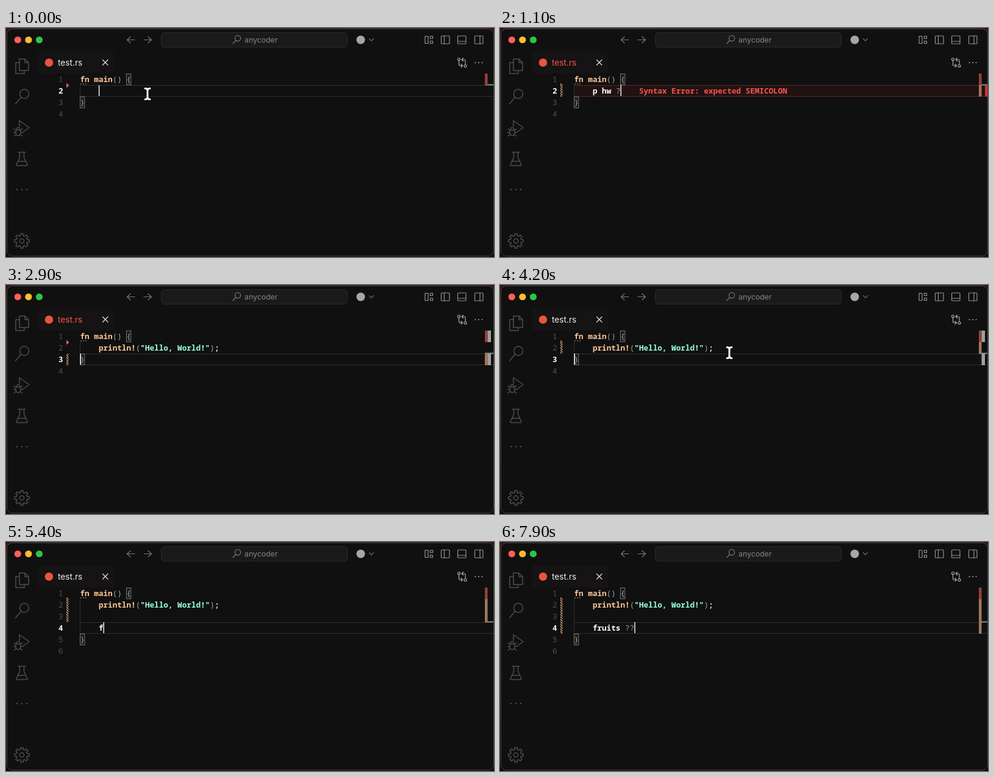
An HTML page for the animation above (8 s loop, 800 by 377 pixels).

```html
<!DOCTYPE html>
<html lang="en">
<head>
<meta charset="utf-8">
<title>Editor typing</title>
<style>
  html, body { margin: 0; height: 100%; overflow: hidden; background: #000; }
  svg { display: block; width: 800px; height: 377px; }
  .ui { font-family: Inter, "Open Sans", sans-serif; }
  .code { font: 12.67px "Noto Sans Mono", "DejaVu Sans Mono", monospace; white-space: pre; }
  .icon { fill: none; stroke-linecap: round; stroke-linejoin: round; }
</style>
</head>
<body>
<svg viewBox="0 0 800 377">
  <defs>
    <linearGradient id="desk" x2="0" y2="1">
      <stop offset="0" stop-color="#35150f"/>
      <stop offset=".6" stop-color="#2a1a15"/>
      <stop offset="1" stop-color="#0c0a0a"/>
    </linearGradient>
    <pattern id="hatch" width="4" height="4" patternUnits="userSpaceOnUse">
      <path d="M-1 -1L5 5M-1 3L1 5M3 -1L5 1" stroke="#e0ae82" stroke-width="1.3"/>
    </pattern>
  </defs>
  <rect width="800" height="377" fill="url(#desk)"/>
  <rect x="1.5" y="1.5" width="798" height="374" rx="9" fill="#101010" stroke="#454240"/>

  <g id="lights"></g>
  <rect x="254.5" y="7.5" width="305" height="24" rx="5.5" fill="#1a1a1a" stroke="#2b2b2b"/>
  <g class="icon" stroke="#777" stroke-width="1.2">
    <path d="M204 14.5L198.5 19.5L204 24.5M199 19.5H211M233 14.5L238.5 19.5L233 24.5M238 19.5H226"/>
    <circle cx="380" cy="17" r="4.6"/><path d="M376.7 20.5L372 25.5M595.5 17.7L599 21.2L602.5 17.7"/>
  </g>
  <circle cx="581.5" cy="19.5" r="7" fill="#a6a6a6"/>
  <text class="ui" x="391" y="23.7" font-size="12.3" fill="#858585">anycoder</text>
  <g class="icon" stroke="#929292" stroke-width="1.2">
    <path d="M687 13.5h5v12h-5zM695.5 13.5h4v4h-4zM695.5 21.5h4v4h-4z"/>
    <rect x="713.5" y="13" width="13.5" height="13" rx="1"/><path d="M718.5 13v13"/>
    <rect x="740.5" y="13" width="13.5" height="13" rx="1"/><path d="M741 22h13"/>
    <rect x="768.5" y="13" width="13.5" height="13" rx="1"/><path d="M777 13v13"/>
  </g>

  <path d="M52 75V43q0-5 5-5H172q5 0 5 5V75z" fill="#151313"/>
  <circle cx="70.5" cy="57" r="6.8" fill="#e8563c"/>
  <text id="tab" class="ui" x="85" y="61.5" font-size="13.7">test.rs</text>
  <path class="icon" d="M158.5 52.5l8.5 8.5m0-8.5l-8.5 8.5" stroke="#ddd" stroke-width="1.3"/>
  <g class="icon" stroke="#aaa" stroke-width="1.2">
    <circle cx="742.5" cy="51.5" r="2"/><circle cx="753" cy="62.5" r="2"/>
    <path d="M742.5 53.5V60q0 2 2 2h3.5M746 59.5l2.5 2.5l-2.5 2.5M753 60.5V54q0-2-2-2h-3.5M749.5 49.5l-2.5 2.5l2.5 2.5"/>
  </g>
  <path class="icon" d="M769.5 57h.01M775 57h.01M780.5 57h.01" stroke="#aaa" stroke-width="2"/>

  <g class="icon" stroke="#4d4d4d" stroke-width="1.5">
    <path d="M22 51h9l6 6v13H22zM31 51v6h6M22 57h-6v18h14v-5"/>
    <circle cx="30" cy="108.5" r="7.5"/><path d="M24.7 114L15.5 125"/>
    <path d="M22 162v-9.5L38 164l-11 8M16 168h8v4q0 5-4 5t-4-5zM17 168q0-4 3-4t3 4M13 166l3 2M27 166l-3 2M12.5 172H16M24 172h3.5M13 178l3.5-2.5M27 178l-3.5-2.5"/>
    <path d="M20 204.5h12M22.5 205v8L17 225q-.5 1.5 1 1.5H34q1.5 0 1-1.5L29.5 213v-8M20 219.5h12"/>
    <path id="gear"/><circle cx="26" cy="350.5" r="3.6"/>
  </g>
  <path class="icon" d="M18 266h.01M26 266h.01M34 266h.01" stroke="#4d4d4d" stroke-width="2.6"/>

  <g id="editor" class="code"></g>
</svg>
<script>
const LOOP = 8000, LEFT = 121.5, CHAR = 7.6, ROW = 19;
const PEACH = '#ffc799', MINT = '#99ffe4', GREY = '#a0a0a0', RED = '#f75450';
const byId = id => document.getElementById(id);
const rowY = n => 75 + ROW * (n - 1);
const rect = (x, y, w, h, fill, more = '') =>
  `<rect x="${x}" y="${y}" width="${w}" height="${h}" fill="${fill}" ${more}/>`;
const label = (x, n, s, fill, more = '') =>
  `<text x="${x}" y="${rowY(n) + 13.5}" fill="${fill}" ${more}>${s}</text>`;
const bold = 'font-weight="700"';

byId('lights').innerHTML = ['#ff5f57', '#febc2e', '#28c840'].map((c, i) =>
  `<circle cx="${19.3 + 17.6 * i}" cy="19.5" r="5.6" fill="${c}"/>`).join('');

// Eight square teeth
const teeth = [];
for (let i = 0; i < 8; i++) {
  for (const [off, r] of [[-.25, 9], [-.17, 12.3], [.17, 12.3], [.25, 9]]) {
    const a = i * Math.PI / 4 + off;
    teeth.push(`${(26 + r * Math.cos(a)).toFixed(1)} ${(350.5 + r * Math.sin(a)).toFixed(1)}`);
  }
}
byId('gear').setAttribute('d', `M${teeth.join('L')}Z`);

const PRINT = '    println!("Hello, World!");';
const SHORT = [200, 400, 500, 700, 800, 1000, 1300];
const FRUITS = [5400, 5500, 5700, 5800, 5900, 6100, 6300, 7200, 7500];
const EDITS = [0, ...SHORT, 2800, 4500, 4700, 5000, ...FRUITS];
const typed = (s, times, t) => s.slice(0, times.filter(k => k <= t).length);

function stateAt(t) {
  const body = [], s = { row: 2, hatch: null };
  if (t < 2800) {
    body.push('    ' + typed('p hw ??', SHORT, t));
    if (t >= 700) s.hatch = [2, 2];
  } else {
    body.push(PRINT);
    if (t >= 4700) body.push(t < 5000 ? '    ' : '');
    if (t >= 5000) body.push('    ' + typed('fruits ??', FRUITS, t));
    s.row = t < 4500 ? 3 : body.length + 1;
    s.hatch = t < 3400 ? [3, 3] : [2, t < 5200 ? 2 : t < 5700 ? 3 : 4];
  }
  s.lines = ['fn main() {', ...body, '}', ''];
  s.col = s.lines[s.row - 1] === '}' ? 0 : s.lines[s.row - 1].length;
  s.error = t >= 1000 && t < 2800;
  s.redTab = t >= 1000 && t < 3500;
  const last = EDITS.filter(k => k <= t).pop();
  s.caret = (t - last) % 1000 < 500;
  return s;
}

function codeLine(line, n) {
  return [...line.matchAll(/"[^"]*"|\w+!?|[^\s\w]/g)].map(m => {
    const w = m[0];
    const fill = w[0] === '"' ? MINT : /^(fn|main|println!)$/.test(w) ? PEACH
      : /\w/.test(w) ? '#fff' : w === ';' ? '#ddd' : GREY;
    return label(LEFT + CHAR * m.index, n, w, fill, /[\w;]/.test(w) ? bold : '');
  }).join('');
}

function pointer(t) {
  if (t >= 200 && t < 3700 || t >= 4700) return '';
  let x = 232, y = 108.5;
  if (t >= 3700) {
    const go = Math.min(1, (t - 3700) / 400), ease = go * go * (3 - 2 * go);
    const back = Math.max(0, Math.min(1, (t - 4200) / 300));
    x += 144 * ease - 22 * back;
    y += 3 * ease - 7 * back;
  }
  const d = `M${x - 4} ${y - 9}q4 0 4 3.5q0-3.5 4-3.5M${x} ${y - 6}v12M${x - 4} ${y + 9}q4 0 4-3.5q0 3.5 4 3.5`;
  return `<path class="icon" d="${d}" stroke="#000" stroke-width="5"/>` +
    `<path class="icon" d="${d}" stroke="#fff" stroke-width="3"/>`;
}

function draw(t) {
  const s = stateAt(t), y = rowY(s.row), last = s.lines.length - 1;
  const out = [];
  byId('tab').setAttribute('fill', s.redTab ? RED : '#eee');

  // Current line, indent guide and matched brackets
  if (s.error) out.push(rect(121, y, 678, ROW, '#211211'));
  out.push(`<path d="M121 ${y + .5}H799M121 ${y + 18.5}H799" stroke="${s.error ? '#5a2826' : '#303030'}"/>`);
  out.push(rect(121, rowY(2), 1, ROW * (last - 2), '#303030'));
  for (const [x, n] of [[LEFT + 10 * CHAR, 1], [LEFT, last]])
    out.push(rect(x, rowY(n) + .5, 7.3, 18, '#1b1b1b', 'stroke="#727272"'));

  s.lines.forEach((line, i) => {
    const n = i + 1, on = n === s.row;
    out.push(label(93.5, n, n, on ? '#fff' : '#505050', 'text-anchor="end" ' + (on ? bold : '')));
    out.push(codeLine(line, n));
  });
  out.push('<path class="icon" d="M123 92h.01M127 92h.01M131 92h.01" stroke="#ccc" stroke-width="1.5"/>');
  if (s.error)
    out.push(label(LEFT + CHAR * (s.col + 4), 2, 'Syntax Error: expected SEMICOLON', RED, bold));
  if (s.caret) out.push(rect(LEFT + CHAR * s.col, y, 1.5, ROW - 1, '#eee'));

  // Change marks in the gutter and overview ruler
  out.push('<path d="M99 90.5L103.5 94.5L99 98.5z" fill="#e0605a"/>');
  out.push(rect(785, y - 1.5, 14, 2, '#858585'));
  out.push(rect(785, 75, 4.5, ROW, '#963f3c'));
  if (s.hatch) {
    const from = rowY(s.hatch[0]), h = rowY(s.hatch[1] + 1) - from;
    out.push(rect(99, from, 4, h, '#101010'), rect(99, from, 3.5, h, 'url(#hatch)'));
    out.push(rect(785, from, 4.5, h, '#a1775a'));
  }
  if (s.row === last)
    for (const n of [1, last]) out.push(rect(789.5, rowY(n), 5.5, ROW, '#a0a0a0'));
  if (s.error) out.push(rect(795, y, 4, ROW, '#d5302c'));

  out.push(pointer(t));
  byId('editor').innerHTML = out.join('');
}

let shown = -1;
function tick() {
  const t = Math.floor(performance.now() % LOOP / 100) * 100;
  if (t !== shown) draw(shown = t);
  requestAnimationFrame(tick);
}
tick();
</script>
</body>
</html>
```
